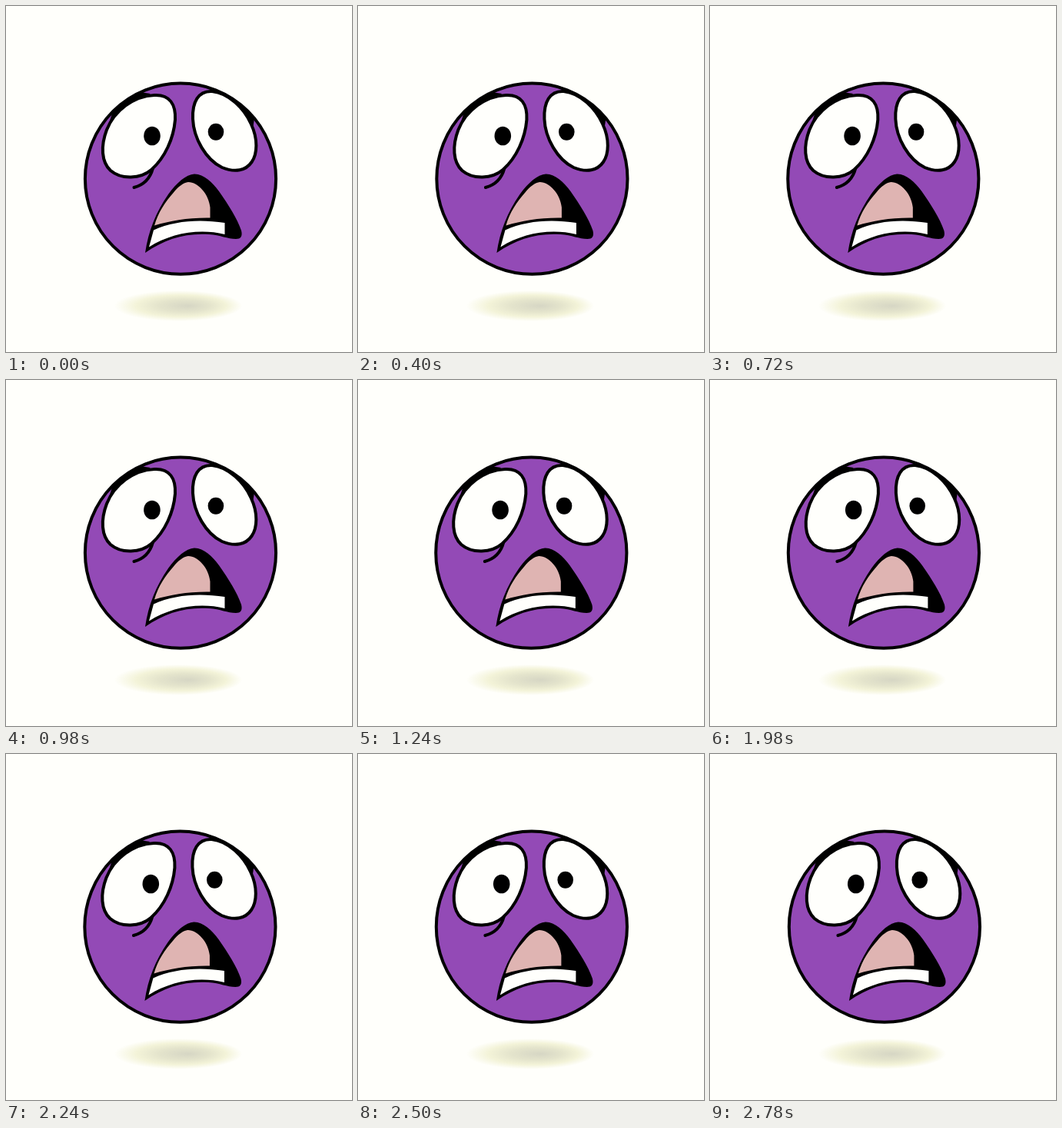
An HTML page for the animation above (2.88 s loop, 450 by 450 pixels).

```html
<!DOCTYPE html>
<html lang="en">
<head>
<meta charset="utf-8">
<title>Trembling face</title>
<style>
  html, body { margin: 0; width: 100%; height: 100%; overflow: hidden; background: #fffffb; }
  svg { display: block; width: 100%; height: 100%; }
  .line { stroke: #000; stroke-width: 4; stroke-linecap: round; stroke-linejoin: round; }
  .white { fill: #fffffc; }
</style>
</head>
<body>
<svg viewBox="0 0 450 450">
  <defs>
    <radialGradient id="shade" fx=".58" fy=".5">
      <stop offset="0" stop-color="#d6d6c4"/>
      <stop offset=".4" stop-color="#e4e4cc"/>
      <stop offset=".7" stop-color="#f3f3d8"/>
      <stop offset="1" stop-color="#fffffb"/>
    </radialGradient>
  </defs>
  <ellipse cx="224" cy="390" rx="83" ry="20" fill="url(#shade)"/>

  <g id="head">
    <circle class="line" cx="227" cy="224.7" r="124.1" fill="#934ab6"/>
    <!-- heavy ink where the eyes meet the rim -->
    <path d="M139 137A124 124 0 0 1 174 112L188 114L160 130L134 152Z"/>
    <path d="M300 124A124 124 0 0 1 323 146L321 160L302 134Z"/>
    <path class="line" fill="none" d="M191 211C187 226 178 233 166.500 236"/>
    <path class="line white" d="M193 116C213 115 221 128 220 148C218 172 207 197 189 213
      C175 225 150 226 136 214C124 203 123 182 131 161C141 136 166 117 193 116Z"/>
    <path class="line white" d="M268 111C290 113 310 134 318.500 153C328 173 327 192 319.500 203
      C312 214 298 217 281 210C260 200 244 172 243 147C242 125 250 110 268 111Z"/>

    <!-- mouth, tongue, teeth -->
    <path d="M181 321C185 293 195 268 211 245C222 230 234 219 245 218.500
      C258 219 268 229 277 241C289 258 301 277 306 292C308 300 305 303 299 303
      C288 303 279 298 264 297C233 295 207 303 181 321Z"/>
    <path fill="#dfb4b2" d="M193 285.500C198 268 207 255 218 242.500C224 235 231 229.500 237 229
      C250 229 264 245 265.500 262V275.500C238 275 214 279 193 285.500Z"/>
    <path class="white" d="M192 291.500C219 279 252 277 284.500 282V297
      C252 289 215 295 186 313.500Z"/>
  </g>

  <g id="pupils">
    <ellipse cx="190" cy="169" rx="10.800" ry="12.300"/>
    <ellipse cx="273" cy="163.700" rx="10.300" ry="11"/>
  </g>
</svg>
<script>
  const LOOP = 2880, STEPS = 60, STEPS_PER_SWAY = 10, PHASE = 0.2;
  const head = document.getElementById('head');
  const pupils = document.getElementById('pupils');

  // Steps come in threes, held for 20, 20 and 100 ms.
  function stepAt(time) {
    const shifted = time + 20;
    const triple = Math.floor(shifted / 140);
    const part = Math.min(2, Math.floor(shifted % 140 / 20));
    return Math.min(STEPS - 1, triple * 3 + part - 1);
  }

  const easeInOut = p => p < 0.5 ? 4 * p ** 3 : 1 - 4 * (1 - p) ** 3;

  // 0 at the right end of the sway, 1 at the left end.
  function swayAt(step) {
    const turn = (step + STEPS_PER_SWAY - PHASE) / STEPS_PER_SWAY % 1;
    return easeInOut(1 - Math.abs(1 - 2 * turn));
  }

  const shift = (part, x) => part.setAttribute('transform', `translate(${x.toFixed(3)} 0)`);

  function draw(now) {
    const sway = swayAt(stepAt(now % LOOP));
    shift(head, sway * -1.7);
    shift(pupils, sway * -5);
    requestAnimationFrame(() => draw(performance.now()));
  }

  draw(performance.now());
</script>
</body>
</html>
```
